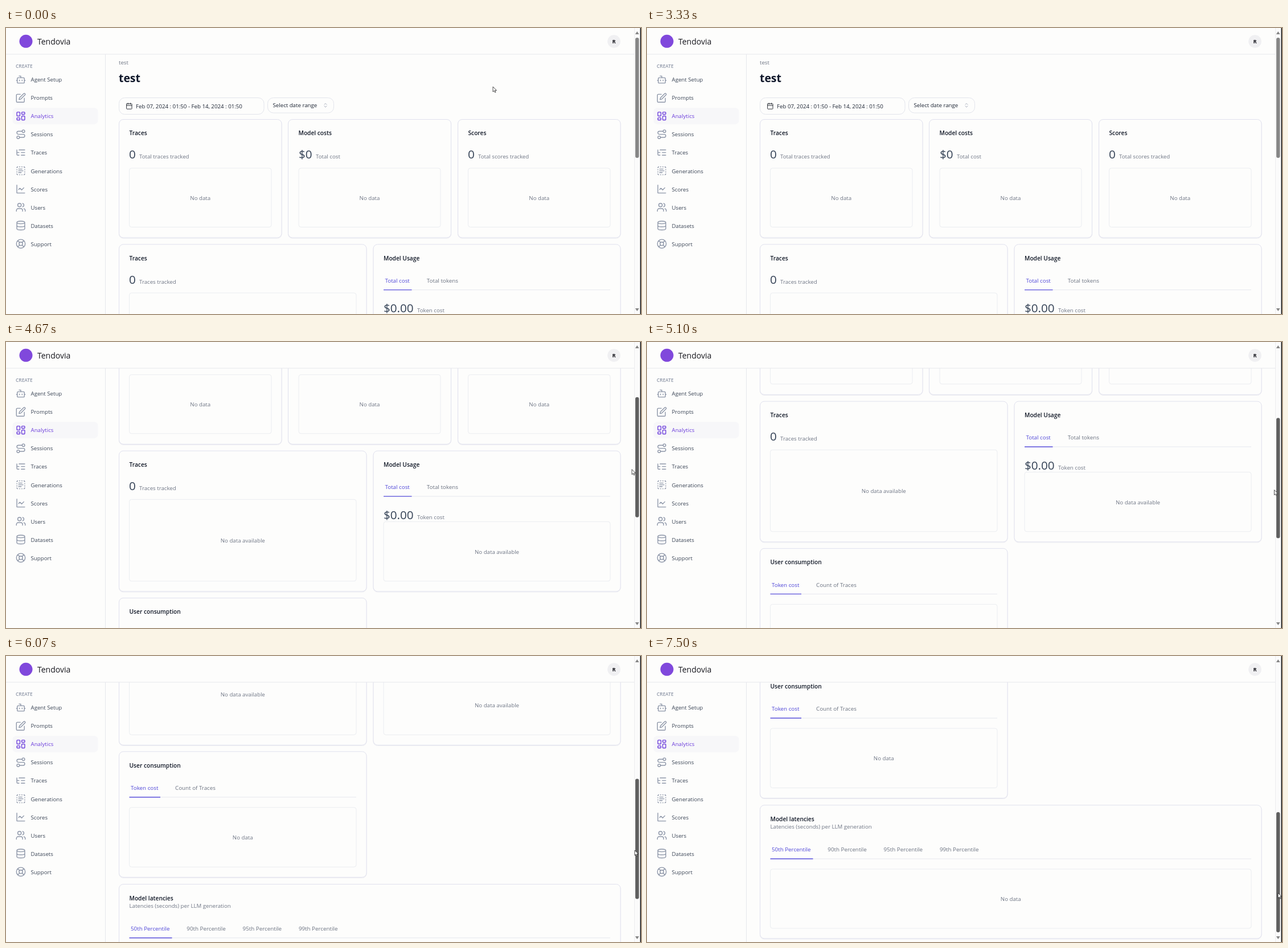
An HTML page for the animation above (8000 ms loop, 1115 px wide and 502 px high).

```html
<!DOCTYPE html>
<html lang="en">
<head>
<meta charset="utf-8">
<title>Analytics dashboard</title>
<style>
html, body { margin: 0; width: 100%; height: 100%; overflow: hidden; background: #fdfdfc; }
svg { display: block; width: 100%; height: 100%; font-family: "Open Sans", "Noto Sans", sans-serif; }
text { white-space: pre; }
.small { font-size: 9.7px; fill: #6f7685; }
.dark { font-size: 9.7px; fill: #1c2433; }
.nav { font-size: 9.7px; font-weight: 500; fill: #3c4657; }
.tab { font-size: 9.8px; font-weight: 500; fill: #6b7280; }
.on { fill: #4f46d8; }
.head { font-size: 10.2px; font-weight: 600; fill: #111827; }
.big { font-size: 20.6px; font-weight: 500; fill: #334155; }
.title { font-size: 19.4px; font-weight: 700; fill: #0f172a; }
.brand { font-size: 14px; font-weight: 500; fill: #18181f; }
.group { font-size: 8.4px; font-weight: 600; fill: #8f97a8; }
.avatar { font-size: 9.2px; font-weight: 700; fill: #18181f; }
.active { fill: #6d3fdc; }
.icon { fill: none; stroke: #8d96a8; stroke-width: 1.8; stroke-linecap: round; stroke-linejoin: round; }
</style>
</head>
<body>
<svg id="stage" viewBox="0 0 1115 502" preserveAspectRatio="none">
  <rect width="1115" height="502" fill="#fdfdfc"/>
  <g id="page"></g>
  <g id="shell"></g>
  <g id="bar">
    <rect x="1104" width="9.5" height="502" fill="#fbfbfb"/>
    <path d="M1103.5 0V502" stroke="#ededee"/>
    <path d="M1104.8 11l3.4-5 3.4 5zM1104.8 492l3.4 5 3.4-5z" fill="#858585"/>
    <rect id="thumb" x="1105" y="17" width="6.4" height="211" rx="3.2"/>
    <rect x="1113.5" width="1.5" height="502" fill="#161616"/>
  </g>
  <path id="cursor" d="M0 0V9L2.1 7.1 3.6 10.2 5 9.5 3.6 6.5H6.4Z" fill="#fff" stroke="#222" stroke-width=".8" stroke-linejoin="round"/>
</svg>
<script>
const LOOP = 8000;
const $ = id => document.getElementById(id);
const page = $("page"), shell = $("shell"), thumb = $("thumb"), cursor = $("cursor");

function add(parent, tag, attrs, content) {
  const el = document.createElementNS("http://www.w3.org/2000/svg", tag);
  for (const k in attrs) el.setAttribute(k, attrs[k]);
  if (content) el.textContent = content;
  parent.append(el);
  return el;
}

const SIZES = { title: 19.4, big: 20.6, brand: 14, group: 8.4, avatar: 9.2, head: 10.2 };

// y is the middle of the capital letters
function text(parent, x, y, cls, str, anchor = "start") {
  const size = SIZES[cls] || 9.7;
  add(parent, "text", { x, y: y + size * 0.357, class: cls, "text-anchor": anchor }, str);
}

function box(x1, y1, x2, y2, rx, stroke, fill = "none") {
  return add(page, "rect", { x: x1, y: y1, width: x2 - x1, height: y2 - y1, rx, stroke, fill });
}

function line(parent, d, stroke, width = 1) {
  add(parent, "path", { d, stroke, "stroke-width": width, fill: "none" });
}

function card(x1, y1, x2, y2, title) {
  box(x1, y1 + 1.2, x2, y2 + 1.2, 7.5, "#ececf1");
  box(x1, y1, x2, y2, 7.5, "#e0e1ee", "#fdfdfc");
  text(page, x1 + 18, y1 + 24.3, "head", title);
}

function empty(x1, y1, x2, y2, label) {
  box(x1, y1, x2, y2, 4, "#ebedf1");
  text(page, (x1 + x2) / 2, (y1 + y2) / 2 + 0.7, "small", label, "middle");
}

function metric(x, y, value, labelX, label) {
  text(page, x, y, "big", value);
  text(page, labelX, y + 4, "small", label);
}

// The first tab is the selected one
function tabs(x1, x2, y, underline, items) {
  items.forEach(([x, label], i) => text(page, x, y, i ? "tab" : "tab on", label));
  line(page, `M${x1} ${y + 16}H${x2}`, "#e6e8ee");
  line(page, `M${x1} ${y + 16}H${underline}`, "#5a50dc", 1.4);
}

function icon(parent, d, x, y, scale, stroke) {
  const el = add(parent, "path", { d, class: "icon", transform: `translate(${x} ${y}) scale(${scale}) translate(-12 -12)` });
  if (stroke) el.style.stroke = stroke;
}

const circle = (x, y, r) => `M${x - r} ${y}a${r} ${r} 0 1 0 ${2 * r} 0a${r} ${r} 0 1 0 ${-2 * r} 0`;
const rect = (x, y, w, h) => `M${x + 1} ${y}h${w - 2}l1 1v${h - 2}l-1 1h${2 - w}l-1-1v${2 - h}z`;

function buildPage() {
  text(page, 198, 60.5, "small", "test");
  text(page, 198, 87.6, "title", "test");

  box(198.5, 122.5, 453, 151.5, 10, "#e3e5ec");
  icon(page, rect(3, 4, 18, 18) + "M16 2v4M8 2v4M3 10h18", 216.3, 137, 0.52, "#20242c");
  text(page, 228, 137.7, "dark", "Feb 07, 2024 : 01:50 - Feb 14, 2024 : 01:50");
  box(459.5, 122.5, 575.5, 149, 10, "#e3e5ec");
  text(page, 468.5, 136, "dark", "Select date range");
  icon(page, "M7 15l5 5 5-5M7 9l5-5 5 5", 561, 135.7, 0.42);

  card(198.5, 160.5, 484, 368, "Traces");
  metric(216, 222, "0", 234, "Total traces tracked");
  empty(216.5, 246, 466, 349.5, "No data");
  card(495.5, 160.5, 781.5, 368, "Model costs");
  metric(514, 222, "$0", 544, "Total cost");
  empty(514, 246, 763, 349.5, "No data");
  card(793.5, 160.5, 1079, 368, "Scores");
  metric(811, 222, "0", 829, "Total scores tracked");
  empty(811.5, 246, 1061, 349.5, "No data");

  card(198.5, 379.8, 633, 626.5, "Traces");
  metric(216, 441.3, "0", 234, "Traces tracked");
  empty(216.5, 465, 615, 608.5, "No data available");
  card(645, 379.8, 1079, 626.5, "Model Usage");
  tabs(663, 1061, 443.6, 712.5, [[665.5, "Total cost"], [738.8, "Total tokens"]]);
  metric(663, 492, "$0.00", 722, "Token cost");
  empty(663, 504, 1061, 608.5, "No data available");

  card(198.5, 638, 633, 858.5, "User consumption");
  tabs(216.5, 615, 702, 271, [[219, "Token cost"], [297, "Count of Traces"]]);
  empty(216.5, 736, 615, 840.5, "No data");

  card(198.5, 870.8, 1079, 1104.8, "Model latencies");
  text(page, 216.5, 908.5, "small", "Latencies (seconds) per LLM generation");
  tabs(216.5, 1061, 949, 291.5, ["50th", "90th", "95th", "99th"].map((p, i) => [219 + 98.3 * i, p + " Percentile"]));
  empty(216.5, 983, 1061, 1087, "No data");
}

function buildShell() {
  add(shell, "rect", { width: 174, height: 502, fill: "#fdfdfc" });
  add(shell, "rect", { width: 1104, height: 46, fill: "#fdfdfc" });
  line(shell, "M0 46H1103", "#e6e7ec");
  line(shell, "M174.5 46V502", "#e6e7ec");
  add(shell, "circle", { cx: 35, cy: 23.3, r: 11.5, fill: "#8048dc" });
  text(shell, 55, 24, "brand", "Tendovia");
  add(shell, "circle", { cx: 1067.5, cy: 23.5, r: 11.3, fill: "#f0f0f2" });
  text(shell, 1067.5, 23.8, "avatar", "R", "middle");
  text(shell, 17, 67.5, "group", "CREATE");

  const items = [
    ["Agent Setup", "M12 8V4H8" + rect(4, 8, 16, 12) + "M2 14h2M20 14h2M15 13v2M9 13v2"],
    ["Prompts", "M11 4H4a2 2 0 0 0-2 2v14a2 2 0 0 0 2 2h14a2 2 0 0 0 2-2v-7M18.5 2.5a2.1 2.1 0 0 1 3 3L12 15l-4 1 1-4Z"],
    ["Analytics", rect(3, 3, 7, 9) + rect(14, 3, 7, 5) + rect(14, 12, 7, 9) + rect(3, 16, 7, 5)],
    ["Sessions", circle(6, 19, 3) + "M9 19h8.5a3.5 3.5 0 0 0 0-7h-11a3.5 3.5 0 0 1 0-7H15" + circle(18, 5, 3)],
    ["Traces", "M21 12h-8M21 6H8M21 18h-8M3 6v4c0 1.1.9 2 2 2h3M3 10v6c0 1.1.9 2 2 2h3"],
    ["Generations", "M5 3a2 2 0 0 0-2 2M19 3a2 2 0 0 1 2 2M21 19a2 2 0 0 1-2 2M5 21a2 2 0 0 1-2-2M9 3h1M9 21h1M14 3h1M14 21h1M3 9v1M21 9v1M3 14v1M21 14v1M7 8h8M7 12h10M7 16h6"],
    ["Scores", "M3 3v18h18M19 9l-5 5-4-4-3 3"],
    ["Users", "M16 21v-2a4 4 0 0 0-4-4H6a4 4 0 0 0-4 4v2" + circle(9, 7, 4) + "M22 21v-2a4 4 0 0 0-3-3.9M16 3.1a4 4 0 0 1 0 7.8"],
    ["Datasets", "M3 5a9 3 0 0 0 18 0a9 3 0 0 0-18 0V19a9 3 0 0 0 18 0V5M3 12a9 3 0 0 0 18 0"],
    ["Support", circle(12, 12, 10) + circle(12, 12, 4) + "M4.9 4.9l4.3 4.3M14.8 9.2l4.3-4.3M14.8 14.8l4.3 4.3M9.2 14.8l-4.3 4.3"]
  ];
  items.forEach(([label, d], i) => {
    const y = 90.5 + 32.03 * i, active = label === "Analytics";
    if (active) add(shell, "rect", { x: 11.5, y: y - 14.5, width: 150, height: 29, rx: 7, fill: "#f7f7f9" });
    icon(shell, d, 26, y, 0.77, active && "#6d3fdc");
    text(shell, 43.5, y + 0.4, active ? "nav active" : "nav", label);
  });
}

// Linear interpolation over [time, value] points
function track(t, keys) {
  if (t <= keys[0][0]) return keys[0][1];
  for (let i = 1; i < keys.length; i++) {
    const [t0, a] = keys[i - 1], [t1, b] = keys[i];
    if (t < t1) return a + (b - a) * (t - t0) / (t1 - t0);
  }
  return keys[keys.length - 1][1];
}

const scrollKeys = [[3730, 0], [4000, 71.6], [4670, 188.5], [5570, 370.5], [6070, 470], [6770, 609]];
const cursorX = [[30, 855], [1400, 1120], [3330, 1120], [3570, 1107], [4000, 1106], [4670, 1099], [5570, 1104], [6070, 1104], [6970, 1108]];
const cursorY = [[30, 103], [1400, 140], [3570, 146], [3730, 146], [4000, 176], [4670, 223.5], [5570, 299], [6070, 341], [6970, 416]];

function render(t) {
  const y = track(t, scrollKeys);
  page.setAttribute("transform", `translate(0 ${-y})`);
  thumb.setAttribute("y", 17 + y * 0.422);
  thumb.setAttribute("fill", t < 3570 ? "#878787" : "#606060");
  cursor.setAttribute("transform", `translate(${track(t, cursorX)} ${track(t, cursorY)})`);
}

buildPage();
buildShell();
const start = performance.now();
function tick() {
  render((performance.now() - start) % LOOP);
  requestAnimationFrame(tick);
}
tick();
</script>
</body>
</html>
```
